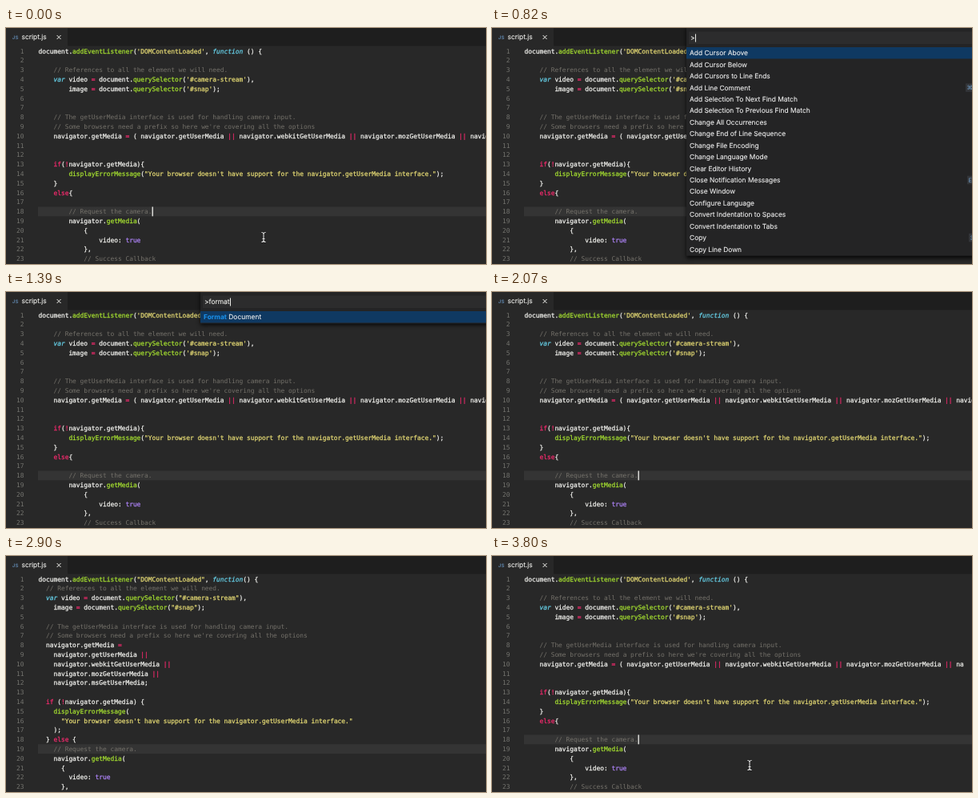
Write an HTML page with a canvas that moves like this. It is 600 px wide and 295 px high and loops after 3.9 s.

```html
<!DOCTYPE html>
<html lang="en">
<head>
<meta charset="utf-8">
<title>Format document</title>
<style>
html, body { margin: 0; width: 100%; height: 100%; overflow: hidden; background: #282828; }
canvas { display: block; width: 600px; height: 295px; }
</style>
</head>
<body>
<canvas id="stage"></canvas>
<script>
const W = 600, H = 295, LOOP = 3900;
const MONO = '"DejaVu Sans Mono", monospace', UI = 'Inter, sans-serif';
const CODE_SIZE = 7.866, CHAR = 4.735, LINE = 11.8, LEFT = 40.5, TOP = 22.9;
const ROW = 14.43, LIST_TOP = 24, PANEL_X = 243;
const C = {
  bg: '#282828', bar: '#1e1e1e', line: '#343434', gutter: '#74746f',
  text: '#f2f2ee', comment: '#74716a', string: '#e3d873', keyword: '#f02a6c',
  type: '#66d0e8', call: '#a4de30', literal: '#ac82f5',
  panel: '#242425', input: '#2c2c2d', focus: '#0f3962', match: '#1b93ee'
};

const MESSAGE = `"Your browser doesn't have support for the navigator.getUserMedia interface."`;
const NOTES = ['// The getUserMedia interface is used for handling camera input.',
  "// Some browsers need a prefix so here we're covering all the options"];

const before = `document.addEventListener('DOMContentLoaded', function () {

    // References to all the element we will need.
    var video = document.querySelector('#camera-stream'),
        image = document.querySelector('#snap');


    ${NOTES[0]}
    ${NOTES[1]}
    navigator.getMedia = ( navigator.getUserMedia || navigator.webkitGetUserMedia || navigator.mozGetUserMedia || navigator.msGetUserMedia);


    if(!navigator.getMedia){
        displayErrorMessage(${MESSAGE});
    }
    else{

        // Request the camera.
        navigator.getMedia(
            {
                video: true
            },
            // Success Callback`.split('\n');

const after = `document.addEventListener("DOMContentLoaded", function() {
  // References to all the element we will need.
  var video = document.querySelector("#camera-stream"),
    image = document.querySelector("#snap");

  ${NOTES[0]}
  ${NOTES[1]}
  navigator.getMedia =
    navigator.getUserMedia ||
    navigator.webkitGetUserMedia ||
    navigator.mozGetUserMedia ||
    navigator.msGetUserMedia;

  if (!navigator.getMedia) {
    displayErrorMessage(
      ${MESSAGE}
    );
  } else {
    // Request the camera.
    navigator.getMedia(
      {
        video: true
      },`.split('\n');

const allCommands = ['Add Cursor Above', 'Add Cursor Below', 'Add Cursors to Line Ends',
  'Add Line Comment', 'Add Selection To Next Find Match', 'Add Selection To Previous Find Match',
  'Change All Occurrences', 'Change End of Line Sequence', 'Change File Encoding',
  'Change Language Mode', 'Clear Editor History', 'Close Notification Messages',
  'Close Window', 'Configure Language', 'Convert Indentation to Spaces',
  'Convert Indentation to Tabs', 'Copy', 'Copy Line Down'];
const formCommands = ['Developer: Startup Performance', 'Format Document',
  'Help: Report Performance Issue', 'Transform to Lowercase', 'Transform to Uppercase'];
const keyHints = [[3, 593, '⌘'], [11, 595, 'E'], [16, 597, '⌘']];

const typing = [[430, ''], [970, 'for'], [1090, 'form'], [1240, 'forma'], [1390, 'format']];

const canvas = document.getElementById('stage');
const ctx = canvas.getContext('2d');
const ratio = window.devicePixelRatio || 1;
canvas.width = W * ratio;
canvas.height = H * ratio;

const within = (t, from, to) => t >= from && t < to;

function rect(x, y, w, h, color) {
  ctx.fillStyle = color;
  ctx.fillRect(x, y, w, h);
}

// Set at 100px and scaled down so that advances stay fractional. Returns the width.
function text(str, x, y, size, color, family, { style = '', weight = 0, align = 'left' } = {}) {
  const k = size / 100;
  ctx.save();
  ctx.translate(x, y);
  ctx.scale(k, k);
  ctx.font = `${style} 100px ${family}`;
  ctx.textAlign = align;
  ctx.textRendering = 'geometricPrecision';
  ctx.fillStyle = ctx.strokeStyle = color;
  ctx.fillText(str, 0, 0);
  if (weight) {
    ctx.lineWidth = weight / k;
    ctx.lineJoin = 'round';
    ctx.strokeText(str, 0, 0);
  }
  const width = ctx.measureText(str).width * k;
  ctx.restore();
  return width;
}

const TOKEN = /(\/\/.*)|('[^']*'|"[^"]*")|(\b(?:if|else)\b|!|=|\|\|)|(\b(?:var|function)\b)|(\btrue\b)|(\w+(?=\())|(\w+|[^\w\s])/g;
const KINDS = ['comment', 'string', 'keyword', 'type', 'literal', 'call', 'text'];

function codeLine(str, y) {
  for (const m of str.matchAll(TOKEN)) {
    const kind = KINDS[m.slice(1).findIndex(g => g !== undefined)];
    const x = LEFT + m.index * CHAR;
    if (x > W) break;
    text(m[0], x, y, CODE_SIZE, C[kind], MONO, {
      style: kind === 'type' ? 'italic' : '',
      weight: kind === 'comment' ? 0 : 0.25
    });
  }
}

function editor(lines, current, caretOn, clipRight) {
  rect(0, 0, W, H, C.bg);
  const lineY = TOP + (current - 1) * LINE;
  rect(LEFT - 0.5, lineY, W - LEFT + 0.5, LINE, C.line);

  lines.forEach((_, i) => text(String(i + 1), 22.5, TOP + i * LINE + 8.6, CODE_SIZE,
    C.gutter, MONO, { align: 'right' }));
  ctx.save();
  ctx.beginPath();
  ctx.rect(0, 0, clipRight, H);
  ctx.clip();
  lines.forEach((str, i) => codeLine(str, TOP + i * LINE + 8.6));
  ctx.restore();

  if (caretOn) rect(LEFT + lines[current - 1].length * CHAR, lineY, 1.3, LINE, C.text);
}

function tabs() {
  rect(77, 0, W - 77, 22.5, C.bar);
  text('JS', 7.8, 14, 6.2, '#5b7fa3', UI, { style: 'bold' });
  text('script.js', 19.5, 14.4, 8.4, C.text, UI, { weight: 0.1 });
  ctx.strokeStyle = C.text;
  ctx.lineWidth = 1;
  ctx.beginPath();
  ctx.moveTo(63.6, 9);
  ctx.lineTo(68.6, 14);
  ctx.moveTo(68.6, 9);
  ctx.lineTo(63.6, 14);
  ctx.stroke();
}

function commandRow(name, query, y) {
  const at = query ? name.toLowerCase().indexOf(query) : -1;
  const end = at < 0 ? 0 : at + query.length;
  const parts = at < 0 ? [[name, false]]
    : [[name.slice(0, at), false], [name.slice(at, end), true], [name.slice(end), false]];
  let x = 247;
  for (const [part, hit] of parts) {
    if (part) x += text(part, x, y, 8.4, hit ? C.match : '#eeeeee', UI,
      { style: hit ? 'bold' : '', weight: hit ? 0 : 0.12 });
  }
}

function palette(query) {
  const names = query ? formCommands.filter(n => n.toLowerCase().includes(query)) : allCommands;
  const picked = query ? names.indexOf('Format Document') : 0;

  ctx.save();
  ctx.shadowColor = 'rgba(0,0,0,0.8)';
  ctx.shadowBlur = 5 * ratio;
  ctx.shadowOffsetY = 3 * ratio;
  rect(PANEL_X, -4, W, LIST_TOP + names.length * ROW + 5, C.panel);
  ctx.restore();

  rect(246, 4.5, W, 15.5, C.input);
  const width = text('>' + query, 248, 15.4, 8.4, C.text, UI, { weight: 0.1 });
  rect(248.4 + width, 7.5, 1, 10, C.text);

  rect(PANEL_X, LIST_TOP + picked * ROW, W, ROW, C.focus);
  names.forEach((name, i) => commandRow(name, query, LIST_TOP + i * ROW + 10.3));
  if (!query) {
    for (const [i, x, key] of keyHints) {
      const y = LIST_TOP + i * ROW;
      rect(x - 1, y + 2, 20, 10.5, '#333539');
      text(key, x + 0.5, y + 10, 7.4, '#6f9cc4', 'Inter, "DejaVu Sans", sans-serif');
    }
  }
}

function pointer(x, y) {
  ctx.beginPath();
  ctx.moveTo(x - 2.6, y - 6);
  ctx.quadraticCurveTo(x, y - 6, x, y - 4);
  ctx.quadraticCurveTo(x, y - 6, x + 2.6, y - 6);
  ctx.moveTo(x, y - 4);
  ctx.lineTo(x, y + 4);
  ctx.moveTo(x - 2.6, y + 6);
  ctx.quadraticCurveTo(x, y + 6, x, y + 4);
  ctx.quadraticCurveTo(x, y + 6, x + 2.6, y + 6);
  ctx.moveTo(x - 1.5, y + 2);
  ctx.lineTo(x + 1.5, y + 2);
  for (const [width, color] of [[2.2, '#151515'], [1.1, '#e8e8e8']]) {
    ctx.lineWidth = width;
    ctx.strokeStyle = color;
    ctx.stroke();
  }
}

function draw(t) {
  ctx.setTransform(ratio, 0, 0, ratio, 0, 0);
  const formatted = within(t, 2190, 3680);
  const caretOn = t < 280 || within(t, 1940, 2630) || within(t, 3140, 3530) || t >= 3680;

  if (formatted) editor(after, 19, caretOn, W);
  else editor(before, 18, caretOn, t >= 3680 ? 589.6 : W);
  tabs();

  if (within(t, 430, 1940)) palette(typing.filter(([at]) => at <= t).pop()[1]);
  if (t < 430 || t >= 3680) pointer(322, 261.5);
  else if (t < 700) pointer(324, 267);
}

const start = performance.now();
function tick() {
  draw((performance.now() - start) % LOOP);
  requestAnimationFrame(tick);
}
tick();
</script>
</body>
</html>
```
